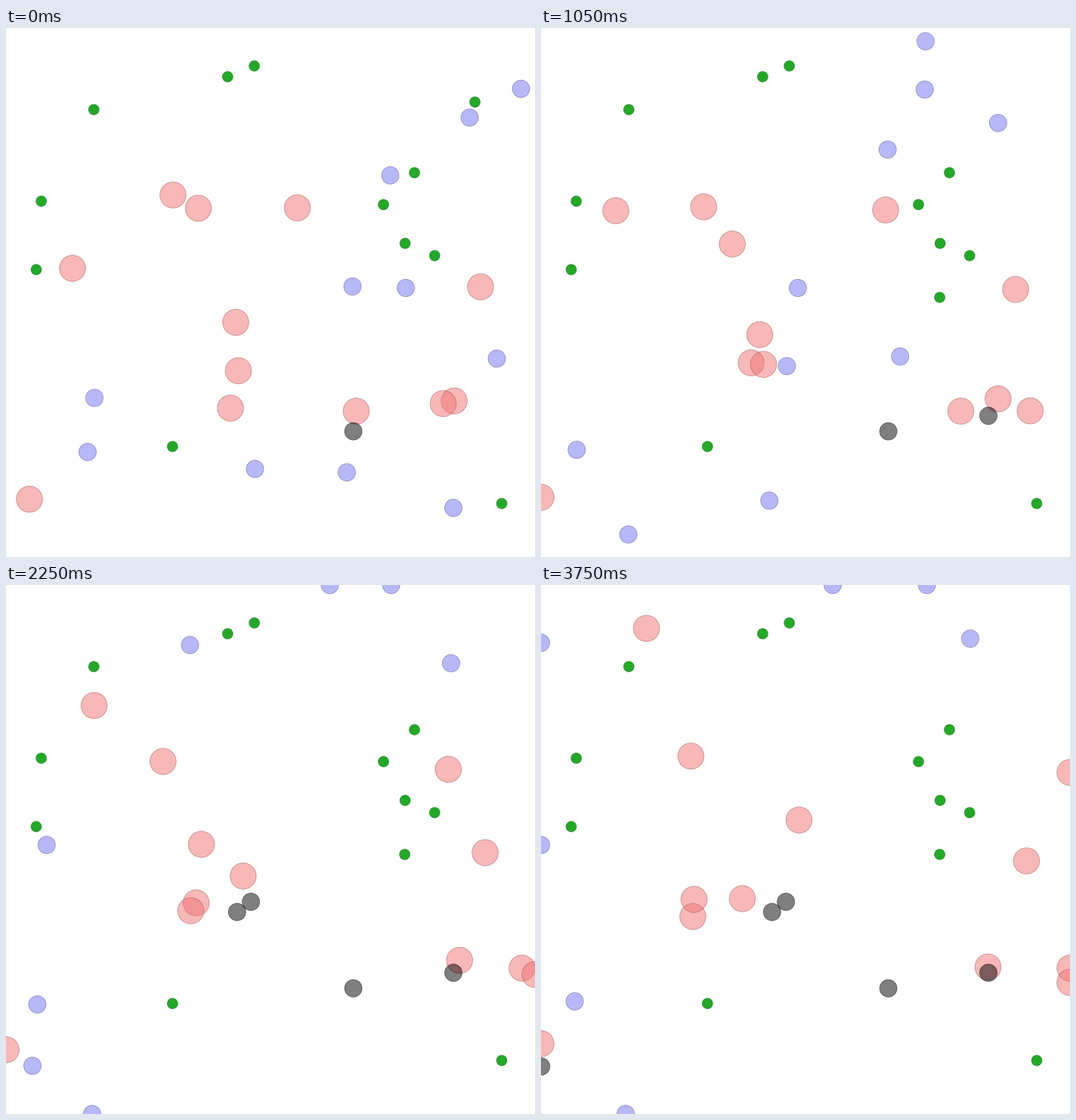
A matplotlib script that plays this animation: 700x700 px, repeating every 3900 ms.

```python
import numpy as np
import matplotlib.pyplot as plt
from matplotlib.animation import FuncAnimation
from matplotlib.patches import Circle

SIZE = 700
STEPS = 26
STEP_MS = 150
SETTLE = 3.5  # steps in which drag brings an agent to its cruise velocity

RED = (0.95, 0.45, 0.45, 0.5)
BLUE = (0.45, 0.45, 0.95, 0.5)
GREEN = (0.14, 0.66, 0.155, 1)
DEAD = (0, 0, 0, 0.5)

fig = plt.figure(figsize=(7, 7), dpi=100, facecolor="white")
ax = fig.add_axes([0, 0, 1, 1])
ax.set_xlim(0, SIZE)
ax.set_ylim(SIZE, 0)
ax.axis("off")


def paint(patch, color):
    patch.set_facecolor(color)
    patch.set_edgecolor((*(0.6 * c for c in color[:3]), 0.5))


def disc(pos, radius, color, z):
    patch = ax.add_patch(Circle(pos, radius, linewidth=0.6, zorder=z))
    paint(patch, color)
    return patch


class Agent:
    """Eases from a first velocity to a cruise velocity; walls stop it."""

    def __init__(self, radius, color, z, start, first, cruise, caught=STEPS):
        self.start, self.first, self.cruise = map(
            np.array, (start, first, cruise))
        self.color = color
        self.caught = caught
        self.patch = disc(start, radius, color, z)

    def move(self, step):
        t = min(step, self.caught)
        lag = SETTLE * (1 - np.exp(-t / SETTLE))
        pos = self.start + self.cruise * t + (self.first - self.cruise) * lag
        self.patch.center = np.clip(pos, 0, SIZE)
        paint(self.patch, DEAD if step >= self.caught else self.color)


def hunter(start, first, cruise):
    return Agent(17.3, RED, 1, start, first, cruise)


def prey(start, first, cruise, caught=STEPS):
    return Agent(11.5, BLUE, 2, start, first, cruise, caught)


agents = [
    hunter((221, 221), (-0.65, 6.15), (-0.95, -0.75)),
    hunter((254.5, 238.5), (-1.5, 6.2), (0.8, 7.2)),
    hunter((385.5, 238), (1, 0.4), (17, 0.4)),
    hunter((88, 318), (0.6, -11.8), (2.3, -10.2)),
    hunter((628, 342.5), (-1.1, -0.3), (0.85, 1.1)),
    hunter((304, 389.5), (1.9, 3), (-5.1, 1.8)),
    hunter((307.5, 453.5), (-4.2, -1.5), (-4.2, -1.5)),
    hunter((297, 503), (-4.5, -9.4), (2.8, -7.4)),
    hunter((463.5, 507), (9, 0), (16.3, 0)),
    hunter((593, 493.5), (5.1, -2.1), (-0.9, 0.9)),
    hunter((578.5, 497), (5, 1.8), (13.5, 1.05)),
    hunter((31, 623.5), (-8, 0.2), (-10, -0.8)),
    prey((681.5, 80.5), (-12.5, 0.7), (-34.2, -0.3)),
    prey((613.5, 118.5), (-0.1, 6.7), (-2.1, -3.3)),
    prey((508.5, 195), (0, -12.4), (0.1, -35.2)),
    prey((458.5, 342), (5.7, -13.1), (-4.3, -35.6)),
    prey((529, 344), (-13.9, 0), (-37, 0)),
    prey((649.5, 437.5), (-10.7, -0.4), (-35.7, -0.4), caught=12),
    prey((117, 489.5), (-0.2, 14.4), (-0.2, 34.5)),
    prey((108, 561), (-20.6, -0.4), (0.4, -0.4)),
    prey((329.5, 583.5), (-0.6, -28.7), (-0.6, -12.4), caught=9),
    prey((451, 588), (-3.1, 11.3), (-35.1, 0.8), caught=16),
    prey((592, 635), (0, -12.4), (0, -38), caught=5),
    prey((459.6, 533.7), (0, 0), (0, 0), caught=0),
]

for spot in [(293.3, 64.5), (328.6, 50.2), (116.2, 108), (540.5, 191.5),
             (46.7, 229.2), (499.5, 233.7), (528.1, 285), (567.2, 301.2),
             (40, 319.7), (220.3, 553.8), (656, 629.2)]:
    disc(spot, 7, GREEN, 3)

# One piece of food is eaten and grows back elsewhere.
EATEN_AT = 3
OLD_SPOT, NEW_SPOT = (620.5, 98), (527.6, 356.5)
regrown = disc(OLD_SPOT, 7, GREEN, 3)


def update(step):
    for agent in agents:
        agent.move(step)
    regrown.center = OLD_SPOT if step < EATEN_AT else NEW_SPOT
    return []


anim = FuncAnimation(fig, update, frames=STEPS, interval=STEP_MS,
                     repeat=True, repeat_delay=0, blit=False)
plt.show()
```
